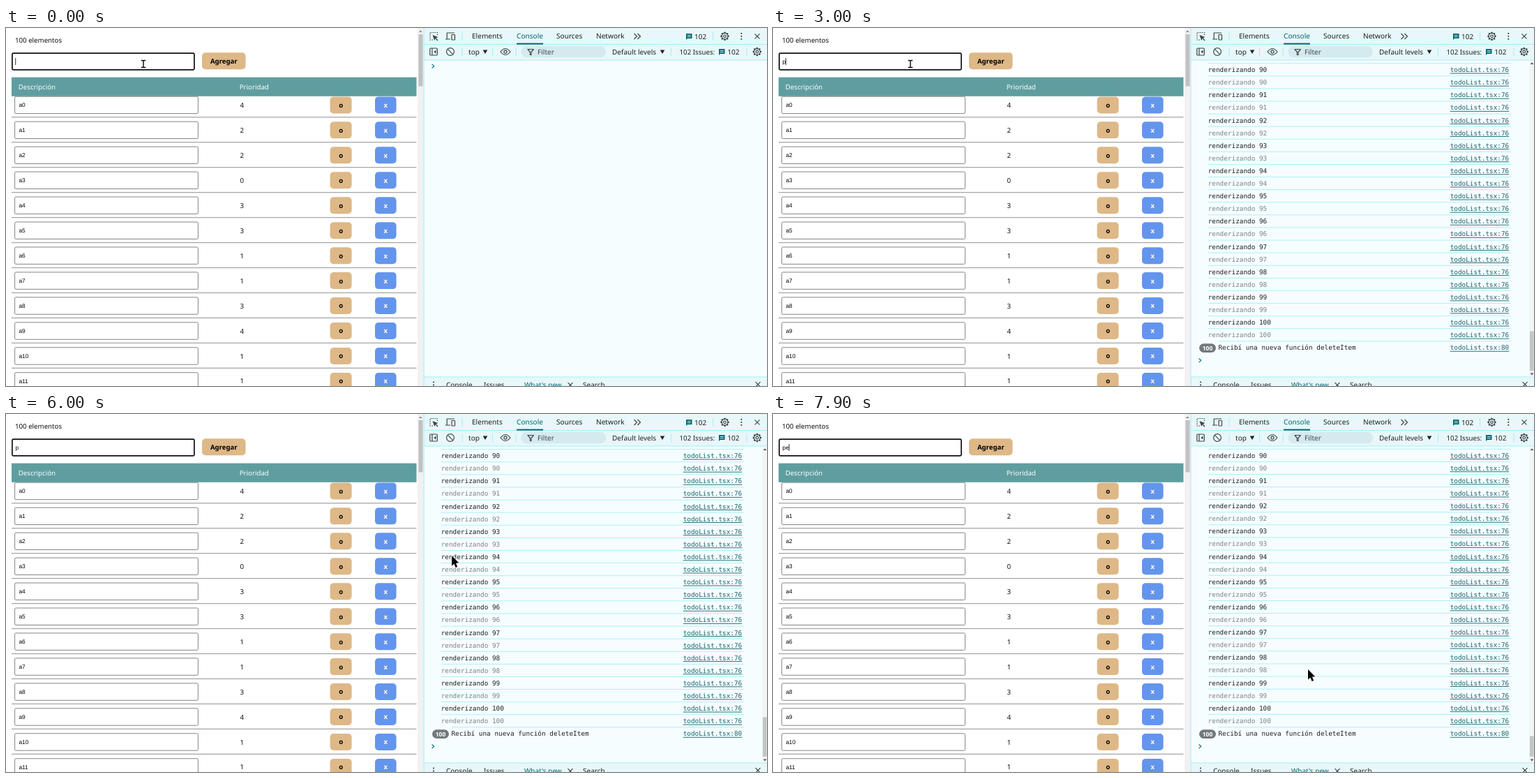
An HTML page with a canvas that plays this animation: 1091x513 px, repeating every 8 s.

```html
<!DOCTYPE html>
<html lang="es">
<head>
<meta charset="utf-8">
<title>Lista y consola</title>
<style>
html, body { margin: 0; width: 100%; height: 100%; overflow: hidden; background: #fff; }
canvas { display: block; }
</style>
</head>
<body>
<canvas id="stage" width="1091" height="513"></canvas>
<script>
const ctx = document.getElementById('stage').getContext('2d');
const LOOP = 8000, STEP = 100;
const SANS = '"Noto Sans", "Open Sans", sans-serif';
const MONO = '"DejaVu Sans Mono", monospace';
const INPUT = '"Liberation Sans", Arial, sans-serif';
const INK = '#1b2223', ICON = '#3c4748', TEAL = '#006874', CYAN = '#a3eff8';
const BAR = '#e8f7f9', PANEL = '#f6fdff', TAN = '#deb887', BLUE = '#6495ed';
const HAIR = .9;
const PRIORITIES = '422033113411';

// Each edit restarts the caret blink
const EDITS = [{ at: -514, typed: '' }, { at: 1730, typed: 'p' }, { at: 6570, typed: 'pe' }];
const BLINK = 614;

// Pointer key points; a repeated place is a rest
const KEYS = [
  { t: 0, x: 197, y: 51 }, { t: 4700, x: 197, y: 51 }, { t: 5000, x: 577, y: 239 },
  { t: 5200, x: 700, y: 274 }, { t: 5600, x: 774, y: 199 }, { t: 6000, x: 639, y: 203 },
  { t: 6900, x: 639, y: 203 }, { t: 7400, x: 869, y: 408 }, { t: 7800, x: 728, y: 366 },
  { t: 7900, x: 767, y: 366 }, { t: LOOP, x: 767, y: 366 },
];

function slope(axis, i) {
  const a = KEYS[i], b = KEYS[i + 1];
  return a && b ? (b[axis] - a[axis]) / (b.t - a.t) : 0;
}

// Harmonic mean keeps the curve from overshooting its key points
function tangent(axis, i) {
  const before = slope(axis, i - 1), after = slope(axis, i);
  return before * after > 0 ? 2 * before * after / (before + after) : 0;
}

function along(axis, t) {
  const i = KEYS.findLastIndex(key => key.t <= t);
  const a = KEYS[i], b = KEYS[i + 1], span = b.t - a.t;
  const u = (t - a.t) / span, v = 1 - u;
  return a[axis] * v * v * (1 + 2 * u) + b[axis] * u * u * (1 + 2 * v)
    + span * u * v * (tangent(axis, i) * v - tangent(axis, i + 1) * u);
}

function rect(x, y, w, h, color) {
  ctx.fillStyle = color;
  ctx.fillRect(x, y, w, h);
}

function round(x, y, w, h, r, fill, stroke, width = 1) {
  ctx.beginPath();
  ctx.roundRect(x, y, w, h, r);
  if (fill) { ctx.fillStyle = fill; ctx.fill(); }
  if (stroke) { ctx.strokeStyle = stroke; ctx.lineWidth = width; ctx.stroke(); }
}

function text(str, x, y, size, color, family = SANS, weight = 400, align = 'left') {
  ctx.font = `${weight} ${size}px ${family}`;
  ctx.fillStyle = color;
  ctx.textAlign = align;
  ctx.fillText(str, x, y);
}

// Path data is relative to (x, y)
function shape(x, y, d, fill, stroke, width = 1.2) {
  const path = new Path2D(d);
  ctx.save();
  ctx.translate(x, y);
  ctx.lineJoin = 'round';
  if (stroke) { ctx.strokeStyle = stroke; ctx.lineWidth = width; ctx.stroke(path); }
  if (fill) { ctx.fillStyle = fill; ctx.fill(path); }
  ctx.restore();
}

const outline = (x, y, d, color = ICON, width = 1.2) => shape(x, y, d, null, color, width);
const disc = (x, y, r, fill, stroke) => round(x - r, y - r, 2 * r, 2 * r, r, fill, stroke, 1.2);
const cross = (x, y) => outline(x, y, 'M-3.5-3.5L3.5 3.5M3.5-3.5L-3.5 3.5');
const caretDown = (x, y) => shape(x, y, 'M-3.3-2.8H3.3L0 2.8Z', INK);
const scrollUp = (x, y, color) => shape(x, y, 'M-2.4 1.4H2.4L0-1.4Z', color);
const scrollDown = (x, y, color) => shape(x, y, 'M-2.4-1.4H2.4L0 1.4Z', color);
const prompt = y => outline(612.2, y, 'M-1.6-2.8L1.5 0L-1.6 2.8', '#087b88');

function dots(x, y) {
  for (const d of [-4, 0, 4]) disc(x, y + d, 1.1, ICON);
}

function gear(x, y) {
  for (let i = 0; i < 8; i++) {
    const a = i * Math.PI / 4, c = Math.cos(a), s = Math.sin(a);
    outline(x, y, `M${c * 4.2} ${s * 4.2}L${c * 6.2} ${s * 6.2}`, ICON, 2.2);
  }
  disc(x, y, 4.4, null, ICON);
  disc(x, y, 1.8, null, ICON);
}

function bubble(x, y) {
  shape(x, y, 'M0 0H8.5V7H2L0 9Z', TEAL);
  outline(x, y, 'M1.8 2.4H6.8M1.8 4.7H6.8', BAR, HAIR);
}

function button(label, x, y, w, fill, color) {
  round(x, y - 12, w, 24, 5, fill);
  text(label, x + w / 2, y + 3.4, 9.6, color, SANS, 700, 'center');
}

function row(priority, i) {
  const y = 110.4 + i * 35.96;
  round(12.6, y - 12.2, 262.8, 24.4, 1.7, '#fff', '#767676', HAIR);
  text('a' + i, 18.5, y + 2.9, 8.3, '#000', INPUT);
  text(priority, 335.5, y + 3.5, 9.7, '#111');
  button('o', 464.6, y, 31, TAN, '#000');
  button('x', 529, y, 30.6, BLUE, '#fff');
  rect(8, y + 16.7, 580.5, 1.3, '#a8a8a8');
}

function page(typed) {
  rect(0, 0, 590, 513, '#fff');
  text('100 elementos', 13, 20.8, 9.7, '#111');
  round(8.9, 36.2, 261, 23.6, 1.5, '#fff', '#101010', 1.7);
  text(typed, 13.6, 50.8, 8.3, '#000', INPUT);
  button('Agregar', 281, 47.3, 62.5, TAN, '#000');
  [...PRIORITIES].forEach(row);

  rect(8, 70.6, 580.5, 27.2, '#5f9ea0');
  text('Descripción', 17.7, 87.7, 9.7, '#fff');
  text('Prioridad', 334.7, 87.7, 9.7, '#fff');

  rect(590, 0, 9, 513, '#f1f1f1');
  scrollUp(594.3, 4.6, '#8b8b8b');
  rect(591.5, 9, 6, 74.5, '#c1c1c1');
}

function tabBar() {
  ctx.setLineDash([1.6, 1.4]);
  outline(608, 6.5, 'M4 10.5H0V0H10.5V4');
  ctx.setLineDash([]);
  shape(611.5, 10, 'M0 0L8 3L5 4.2L8 7.4L7 8.4L4 5.2L2.7 8Z', ICON);
  outline(630, 7, 'M13 0H2.2V9H7M0 9H7');
  round(639, 9.5, 4.5, 7.5, .7, BAR, ICON, 1.2);
  text('Elements', 668, 15.4, 10.1, INK);
  text('Console', 732, 15.4, 10.1, TEAL);
  text('Sources', 789, 15.4, 10.1, INK);
  text('Network', 846, 15.4, 10.1, INK);
  rect(732, 21.6, 38, 2, TEAL);
  outline(900.5, 12, 'M0-4L4 0L0 4M5-4L9 0L5 4');
  bubble(975, 8);
  text('102', 987, 15.5, 10, INK);
  gear(1030.5, 11.8);
  dots(1054.3, 11.8);
  cross(1077, 11.8);
}

function filterBar() {
  round(607.8, 29, 10.5, 10, 1, null, ICON, 1.2);
  outline(611, 29, 'M0 0V10');
  shape(613.3, 34, 'M0 0L3.2-2.5V2.5Z', ICON);
  disc(637, 34, 5.4, null, ICON);
  outline(637, 34, 'M-3.8-3.8L3.8 3.8');
  text('top', 663, 37.6, 10.1, INK);
  caretDown(687, 34.3);
  outline(716, 34, 'M-7 0Q0-9 7 0Q0 9-7 0Z');
  disc(716, 34, 2.1, null, ICON);
  round(738.5, 26, 121.5, 16.3, 8.1, '#d5eaee');
  outline(752.2, 34.5, 'M-4.2-4H4.2L.8 0V4H-.8V0Z');
  text('Filter', 762, 37.6, 10.1, '#3f484a');
  text('Default levels', 869, 37.6, 10, INK);
  caretDown(941, 34.3);
  text('102 Issues:', 965.5, 37.6, 9.75, INK);
  bubble(1022, 30);
  text('102', 1034.3, 37.6, 10, INK);
  gear(1076.8, 34);
}

function devtools() {
  rect(599, 0, 492, 513, PANEL);
  rect(599, 0, 492, 46, BAR);
  rect(599, 500, 492, 13, BAR);
  rect(598.6, 0, 1, 513, CYAN);
  for (const y of [23, 45.5, 499.5]) rect(599, y, 492, 1, CYAN);
  for (const x of [653.5, 1013]) rect(x, 6, 1, 12, CYAN);
  for (const x of [653.5, 697, 730.5, 953, 1061.5]) rect(x, 28.5, 1, 12, CYAN);
  tabBar();
  filterBar();

  dots(613, 511.5);
  text('Console', 631, 515.3, 10, INK);
  text('Issues', 685, 515.3, 10, INK);
  text("What's new", 743, 515.3, 10, TEAL);
  text('Search', 827, 515.3, 10, INK);
  cross(809, 511.7);
  cross(1078, 510.7);
}

function entry(str, x, y, color, source) {
  rect(x, y - 9.5, 1058 - x, HAIR, CYAN);
  text(str, x, y + 3.4, 9.37, color, MONO);
  text(source, 970.7, y + 3.4, 9.37, '#17636d', MONO);
  rect(970.7, y + 4.9, 84.6, HAIR, '#17636d');
}

function log(edited) {
  const top = edited ? 59.3 : 59.7;
  for (let i = 0; i < 22; i++)
    entry('renderizando ' + (90 + (i >> 1)), 623.7, top + i * 18.1, i % 2 ? '#7b8384' : INK, 'todoList.tsx:76');
  entry('Recibí una nueva función deleteItem', 638.4, 457.9, INK, 'todoList.tsx:80');
  round(611, 452.3, 24, 12.6, 6.3, '#717a7b');
  text('100', 623, 461.6, 8.4, '#fff', SANS, 600, 'center');
  prompt(476.3);

  rect(1084, 46.5, 7, 453, '#f1f5f6');
  scrollUp(1088, 50.6, '#505658');
  scrollDown(1088, 496, '#505658');
  const thumb = edited ? 461.5 : 434.5;
  rect(1085, thumb, 5.5, 491 - thumb, '#bfc6c7');
}

function pointer(t) {
  const x = along('x', t), y = along('y', t);
  if (x < 270) outline(x, y + .5, 'M-3.2-5H-.8Q0-5 0-4Q0-5 .8-5H3.2M0-4V4M-3.2 5H-.8Q0 5 0 4Q0 5 .8 5H3.2', '#000', 1.4);
  else shape(x, y, 'M0 0V14.5L3.4 11.8L5.6 17L8.2 16L6 10.8L10.2 10.2Z', '#000', '#fff', 1.3);
}

function draw(t) {
  const edit = EDITS.findLast(e => t + STEP / 2 >= e.at);
  const { typed } = edit;
  const blinks = Math.floor((t + STEP / 2 - edit.at) / BLINK);
  // The first blink cycle begins dark
  const visible = blinks % 2 === 0;
  page(typed);
  if (visible) rect(13.2 + typed.length * 4.7, 43, 1, 10, '#333');
  devtools();
  if (typed) log(typed.length > 1);
  else prompt(54.7);
  pointer(t);
}

function tick() {
  const t = performance.now() % LOOP;
  draw(Math.floor(t / STEP) * STEP);
  requestAnimationFrame(tick);
}

ctx.textRendering = 'geometricPrecision';
tick();
</script>
</body>
</html>
```
